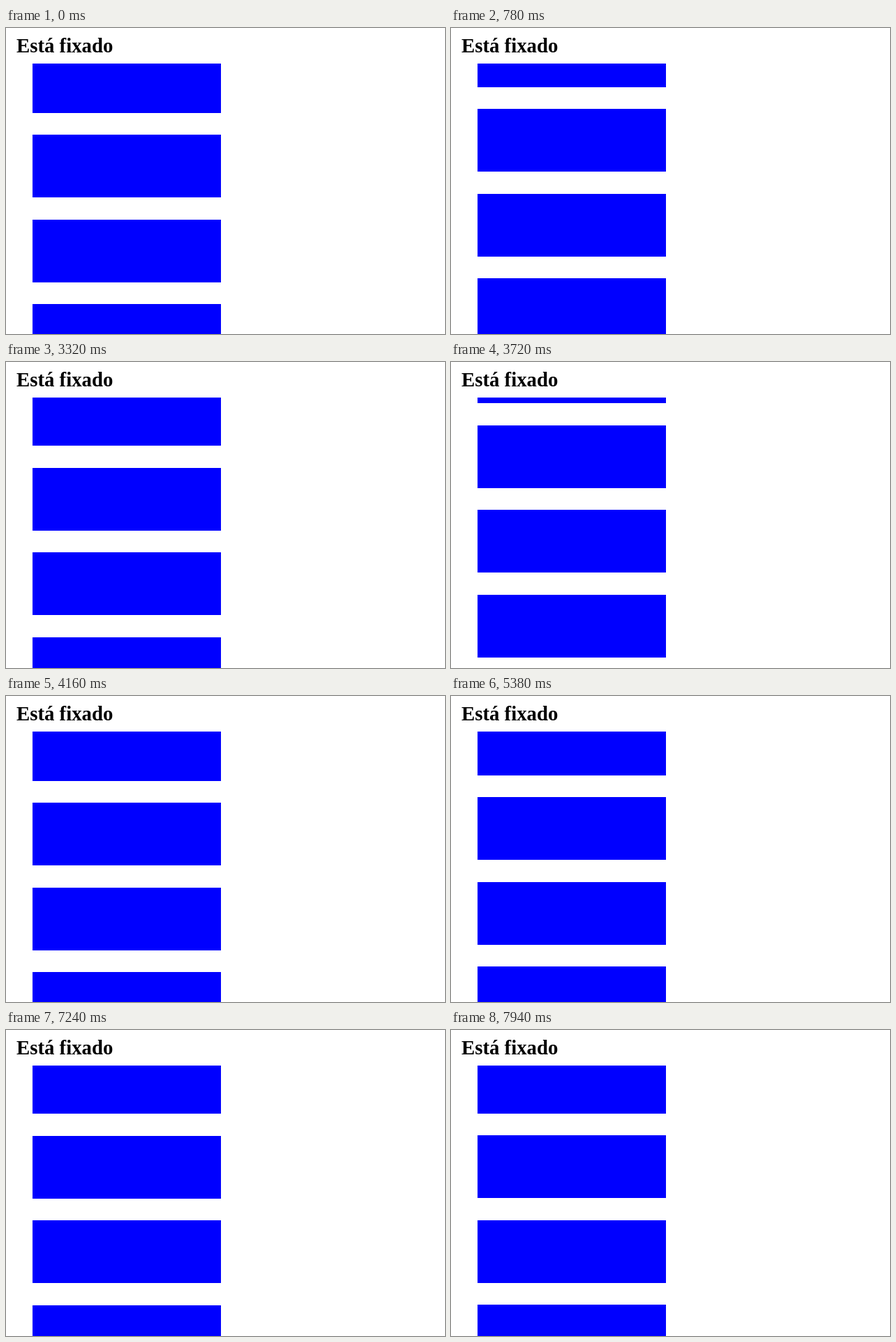
Recreate the animation shown at these times as an HTML page with a canvas. Size 629 px wide and 439 px high, loop 8000 ms.

```html
<!DOCTYPE html>
<html lang="pt">
<head>
<meta charset="utf-8">
<title>Está fixado</title>
<style>
  html, body { margin: 0; width: 100%; height: 100%; overflow: hidden; background: #fff; }
  canvas { position: absolute; left: 0; top: 0; display: block; }
  h1 {
    position: absolute; left: 15px; top: 9px; margin: 0;
    font: bold 28.8px/32px "Liberation Serif", "Times New Roman", serif;
    color: #000; white-space: nowrap;
  }
</style>
</head>
<body>
<canvas id="stage" width="629" height="439"></canvas>
<h1>Está fixado</h1>
<script>
const ctx = document.getElementById('stage').getContext('2d');
const LOOP = 8000;
const HEADER = 51;
const BOX = { x: 38, w: 270, h: 90, top: 31.5, pitch: 121.5, count: 6 };

const smooth = p => p * p * (3 - 2 * p);
const gather = p => Math.pow(p, 1.34);
const settle = p => 1 - (1 - p) * (1 - p);

// Each scroll gesture moves in discrete steps between two offsets.
const gestures = [
  { start: 500, end: 1180, steps: 15, from: 1.2, to: 123.75, ease: smooth },
  { start: 3320, end: 4120, steps: 17, from: 122.75, to: 1.5, ease: smooth },
  { start: 4140, end: 4160, steps: 2, from: 0.75, to: 0, ease: smooth },
  { start: 5260, end: 5980, steps: 17, from: 1.2, to: 103.5, ease: gather },
  { start: 6080, end: 6360, steps: 7, from: 106, to: 124.7, ease: settle },
  { start: 7240, end: 7940, steps: 16, from: 122.75, to: 1.75, ease: smooth }
];

function scrollAt(t) {
  let offset = 0;
  for (const g of gestures) {
    if (t < g.start) break;
    const last = g.steps - 1;
    const step = Math.min(last, Math.floor((t - g.start) / (g.end - g.start) * last + 1e-6));
    offset = g.from + (g.to - g.from) * g.ease(step / last);
  }
  return offset;
}

function draw(t) {
  const scroll = scrollAt(t);
  ctx.fillStyle = '#fff';
  ctx.fillRect(0, 0, 629, 439);
  ctx.fillStyle = '#00f';
  for (let i = 0; i < BOX.count; i++) {
    const y = BOX.top + i * BOX.pitch - scroll;
    const top = Math.max(HEADER, Math.round(y));
    const bottom = Math.round(y + BOX.h);
    if (bottom > top) ctx.fillRect(BOX.x, top, BOX.w, bottom - top);
  }
}

const begin = performance.now();
function tick() {
  draw((performance.now() - begin) % LOOP);
  requestAnimationFrame(tick);
}
tick();
</script>
</body>
</html>
```
